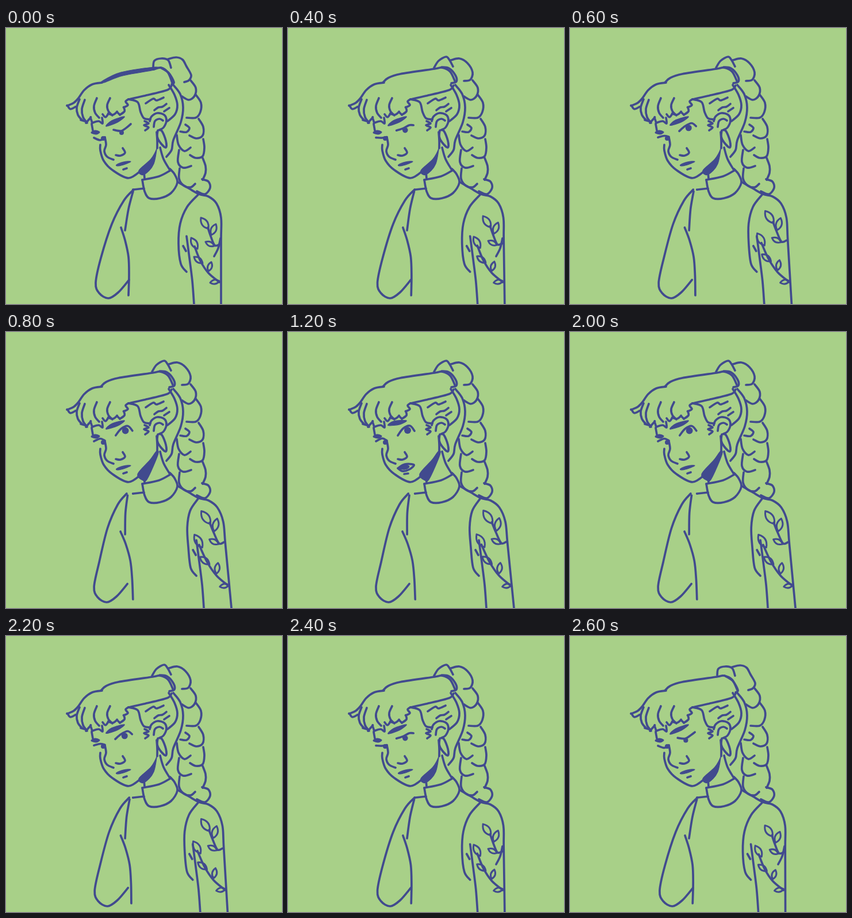
Recreate the animation shown at these times as an HTML page with a canvas. Size 480 px wide and 480 px high, loop 2800 ms.

```html
<!DOCTYPE html>
<html lang="en">
<head>
<meta charset="utf-8">
<title>Turning portrait</title>
<style>
html, body { margin: 0; width: 100%; height: 100%; overflow: hidden; background: #a8d088; }
canvas { display: block; }
</style>
</head>
<body>
<canvas id="stage" width="480" height="480"></canvas>
<script>
const ctx = document.getElementById('stage').getContext('2d');
const INK = '#414a8e', PAPER = '#a8d088', STEP = 200;
// How far the shoulders have turned and the eyes have opened in each drawing.
const TURN = [0, .03, .15, .6, .95, .98, 1, 1.04];
const GAZE = [0, .05, .4, .75, .95, .97, 1, 1.03];

const mix = (a, b, w) => a.map((v, i) => v + (b[i] - v) * w);
const stay = (x, y) => [x, y];

// Smooth curve through flat x, y pairs; a doubled point makes a corner.
function curve(flat, move, closed) {
  const pts = [];
  for (let i = 0; i < flat.length; i += 2) pts.push(move(flat[i], flat[i + 1]));
  const n = pts.length;
  const at = i => pts[closed ? (i + n) % n : Math.max(0, Math.min(n - 1, i))];
  ctx.beginPath();
  ctx.moveTo(...pts[0]);
  for (let i = 0; i < n - (closed ? 0 : 1); i++) {
    const [a, b, c, d] = [at(i - 1), at(i), at(i + 1), at(i + 2)];
    ctx.bezierCurveTo(b[0] + (c[0] - a[0]) / 6, b[1] + (c[1] - a[1]) / 6,
      c[0] - (d[0] - b[0]) / 6, c[1] - (d[1] - b[1]) / 6, ...c);
  }
}

function line(flat, move = stay) {
  curve(flat, move, false);
  ctx.lineWidth = 3.7;
  ctx.stroke();
}

function blot(flat, move = stay) {
  curve(flat, move, true);
  ctx.lineWidth = 1.2;
  ctx.fill();
  ctx.stroke();
}

function dot(x, y, r) {
  ctx.beginPath();
  ctx.arc(x, y, r, 0, 7);
  ctx.fill();
}

function leaf(x, y, tipX, tipY, move) {
  [x, y] = move(x, y);
  [tipX, tipY] = move(tipX, tipY);
  const mx = (x + tipX) / 2, my = (y + tipY) / 2;
  const dx = (tipY - y) * .45, dy = (x - tipX) * .45;
  ctx.beginPath();
  ctx.moveTo(x, y);
  ctx.quadraticCurveTo(mx + dx, my + dy, tipX, tipY);
  ctx.quadraticCurveTo(mx - dx, my - dy, x, y);
  ctx.lineWidth = 3;
  ctx.stroke();
}

const lock = (x, y, length) =>
  line([x, y, x - 5, y + length * .4, x - 3, y + length * .75, x + 4, y + length]);

function drawFringe() {
  line([167, 95, 150, 98, 136, 108, 126, 122, 118, 130, 107, 135, 107, 135, 112, 141, 121, 137]);
  lock(128, 124, 36);
  lock(137, 125, 40);
  lock(158, 122, 34);
  lock(181, 122, 30);
  line([130, 160, 137, 162]);
  line([139, 165, 147, 156, 147, 156, 150, 165, 150, 165, 161, 162, 168, 166, 167, 156]);
  line([168, 150, 173, 155, 178, 149, 178, 149, 186, 151, 193, 146, 193, 146, 198, 151]);
  line([198, 151, 206, 145, 205, 138, 205, 138, 212, 134, 208, 128, 213, 124]);
}

function drawHair(shaded) {
  if (shaded) {
    blot([168, 92, 200, 77, 258, 68, 257, 73, 203, 83, 170, 95]);
    line([257, 72, 270, 69, 282, 78, 290, 98]);
  } else line([165, 95, 174, 87, 195, 80, 255, 71, 268, 69, 282, 76, 291, 94]);
  line([213, 124, 240, 118, 280, 108, 288, 100]);
  line([213, 124, 229, 129, 234, 146, 240, 157, 251, 159]);
  line([243, 131, 256, 123, 262, 126, 274, 121]);
  line([258, 143, 265, 138, 272, 137, 279, 132]);
  line([275, 145, 284, 139]);
  line([283, 99, 293, 116, 298, 134, 294, 150, 281, 162]);
  line([291, 99, 303, 115, 308, 138, 304, 164, 291, 195, 288, 212, 279, 224]);
}

function drawEar() {
  line([250, 162, 253, 154, 263, 148, 275, 151, 279, 161, 274, 173, 267, 177]);
  line([257, 172, 259, 162, 267, 158, 273, 161]);
  line([241, 162, 248, 166, 240, 169, 248, 173, 242, 178]);
  line([264, 178, 263, 189, 268, 199, 278, 208, 278, 196, 271, 179, 264, 178]);
}

function drawBraid(turned) {
  if (turned) {
    line([254, 69, 262, 57, 275, 50, 281, 56, 287, 67]);
    line([283, 56, 298, 53, 312, 61, 321, 77, 317, 90, 306, 92]);
    line([267, 68, 280, 70, 291, 82, 293, 93, 284, 96]);
  } else {
    line([256, 68, 258, 57, 270, 53, 282, 56, 287, 69]);
    line([282, 54, 296, 51, 307, 55, 314, 67, 322, 82, 318, 91, 310, 94]);
    line([269, 69, 283, 78, 292, 94, 288, 98]);
  }
  line([321, 91, 330, 104, 328, 118, 318, 125, 306, 119]);
  line([330, 116, 339, 130, 338, 146, 330, 156, 314, 156]);
  line([335, 158, 343, 172, 342, 187, 331, 192, 319, 187]);
  line([343, 193, 345, 208, 342, 223, 330, 226, 320, 221]);
  line([342, 226, 347, 240, 347, 252, 342, 264]);
  line([312, 168, 319, 174, 314, 181, 303, 180]);
  line([297, 186, 300, 203, 310, 214, 321, 208]);
  line([301, 212, 299, 233, 308, 243, 322, 240]);
  line([302, 244, 301, 262, 309, 274, 321, 277, 329, 271]);
  line([341, 263, 352, 267, 355, 278, 346, 289, 332, 284]);
}

function drawFace(turn, gaze, lipsParted) {
  line([164, 203, 164, 213, 170, 231, 185, 247, 213, 261, 236, 247]);
  line([172, 190, 174, 203, 171, 214, 176, 224, 187, 229]);
  line([191, 221, 199, 222, 207, 217, 203, 209]);
  line([149, 167, 151, 178]);
  line([262, 181, 263, 195, 263, 209]);
  blot(mix([264, 196, 262, 210, 252, 228, 231, 248, 240, 255, 257, 236],
    [262, 207, 250, 223, 229, 247, 238, 258, 246, 255, 264, 214], Math.max(0, turn * 2 - 1) > .5 ? 1 : 0));

  if (lipsParted) {
    line([191, 237, 203, 230, 219, 231, 211, 239, 199, 242, 191, 237]);
    blot([191, 237, 203, 231, 211, 234, 204, 239]);
    line([202, 247, 209, 246]);
  } else {
    blot([192, 238, 204, 233, 217, 232, 207, 237, 195, 240]);
    line([204, 246, 210, 244]);
  }

  const lift = lipsParted ? 8 : gaze * 2;
  blot([174, 171, 184, 161, 206, 154, 194, 164], (x, y) => [x, y - lift * (206 - x) / 30]);
  blot([148, 182, 155, 178, 163, 181, 157, 185]);
  line(mix([187, 177, 200, 179, 210, 173, 217, 167], [191, 180, 200, 168, 212, 163, 220, 172], gaze));
  dot(...mix([201, 182, 4], [208, 171, 6], gaze));
  line(mix([153, 191, 164, 195, 172, 190], [153, 190, 164, 185, 172, 189], gaze));
  dot(169, 192, 4);
}

function drawBody(turn) {
  const arm = (x, y) => [x + turn * Math.max(0, y - 290) * .1, y];
  const sleeve = (x, y) => [x + turn * 18 * Math.min(1, Math.max(0, y - 290) / 70), y];
  const elbow = (x, y) => [x - turn * (3 + 9 * Math.max(0, 400 - y) / 110), y];
  const side = (x, y) => [x + turn * (y < 350 ? (y - 354) / 7 : (y - 350) / 14), y];

  line([237, 264, 241, 284, 249, 296, 268, 296, 287, 287, 298, 269, 293, 254, 285, 245]);
  line([237, 264, 266, 258, 287, 247]);
  line([268, 208, 274, 228, 285, 247]);
  line([240, 250, 241, 262]);
  line([240, 279, 222, 281, 222, 281]);
  line([222, 281, 205, 300, 184, 341, 165, 400, 156, 443, 162, 461, 178, 470, 195, 460, 214, 438], elbow);
  line([221, 284, 213, 315, 207, 352], side);
  line([200, 347, 207, 369, 213, 398, 214, 430, 213, 465], side);
  line([299, 268, 318, 279, 336, 289, 352, 293, 366, 305, 374, 330, 374, 370, 374, 480], arm);
  line([334, 290, 315, 311, 303, 340, 300, 375, 304, 410, 314, 424], sleeve);
  line([314, 362, 319, 400, 324, 440, 327, 480], sleeve);
  line([308, 379, 313, 388], sleeve);
}

function drawVines(turn) {
  const grow = (x, y) => [x + turn * (3 + (y - 345) * .15), y + turn * (Math.min(438, y) - 438) * .18];
  leaf(352, 349, 339, 330, grow);
  leaf(357, 360, 365, 341, grow);
  leaf(362, 379, 347, 372, grow);
  line([351, 347, 356, 362, 363, 378, 372, 376], grow);
  leaf(333, 384, 322, 365, grow);
  leaf(342, 409, 327, 398, grow);
  leaf(352, 423, 357, 407, grow);
  line([328, 380, 338, 405, 352, 426, 371, 442], grow);
  leaf(371, 440, 355, 443, grow);
  if (turn < .5) line([362, 397, 369, 383, 373, 366]);
}

function render(time) {
  const pose = 7 - Math.abs(7 - Math.floor(time / STEP) % 14);
  const turn = TURN[pose], gaze = GAZE[pose];
  ctx.fillStyle = PAPER;
  ctx.fillRect(0, 0, 480, 480);
  ctx.fillStyle = ctx.strokeStyle = INK;
  ctx.lineCap = ctx.lineJoin = 'round';
  drawFringe();
  drawHair(pose === 0);
  drawEar();
  drawBraid(pose > 1);
  drawFace(turn, gaze, pose > 5);
  drawBody(turn);
  drawVines(turn);
}

const start = performance.now();
function tick() {
  render(performance.now() - start);
  requestAnimationFrame(tick);
}
tick();
</script>
</body>
</html>
```
